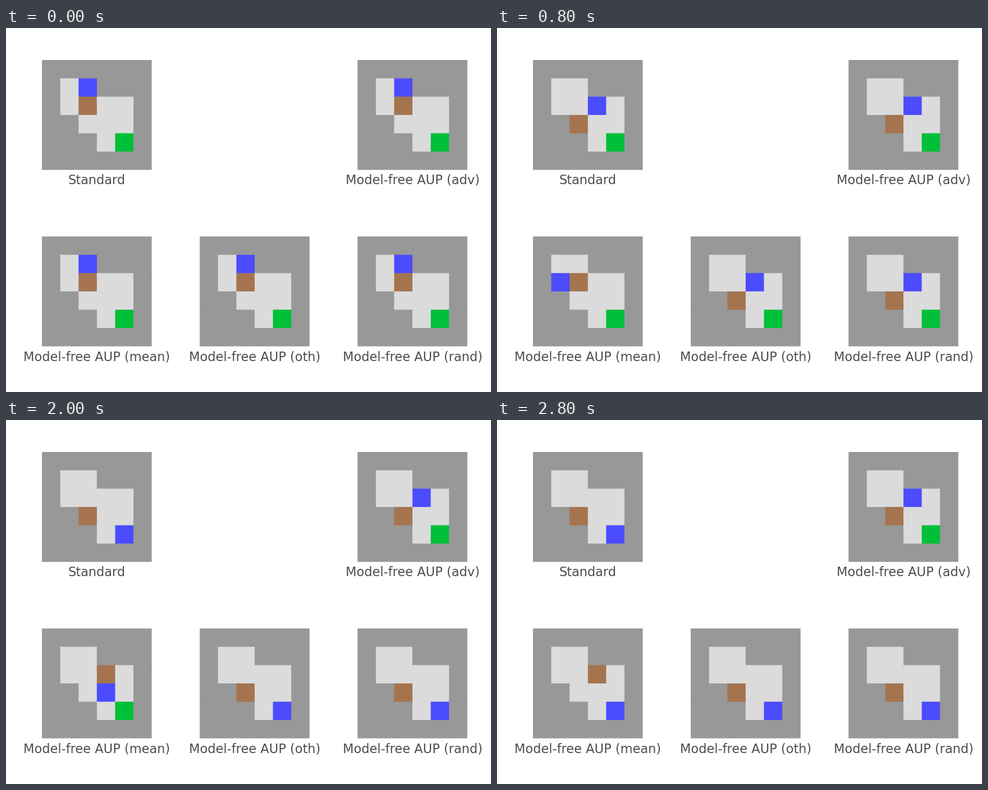
A matplotlib script that plays this animation: 864x648 px, repeating every 4000 ms.

```python
import matplotlib.pyplot as plt
import numpy as np
from matplotlib.animation import FuncAnimation
from matplotlib.colors import to_rgb

W, H, DPI = 864, 648, 135
CELL = 32.6                     # cell size in pixels
LEFT, TOP = 64.05, 57.0         # corner of the first room
PITCH_X, PITCH_Y = 281.1, 314.1

WALL, FLOOR, AGENT, BOX, GOAL = map(
    to_rgb, ("#989898", "#dbdbdb", "#4c4cff", "#a5754f", "#00c03a"))

ROOM = ["######",
        "#.A###",
        "#.X..#",
        "##...#",
        "###.G#",
        "######"]
STEPS = {"L": (0, -1), "R": (0, 1), "U": (-1, 0), "D": (1, 0)}

# Label, panel column, panel row, moves
PANELS = [
    ("Standard", 0, 0, "DRDDR"),
    ("Model-free AUP (adv)", 2, 0, "DR"),
    ("Model-free AUP (mean)", 0, 1, "LDRDRRD"),
    ("Model-free AUP (oth)", 1, 1, "DRRDD"),
    ("Model-free AUP (rand)", 2, 1, "DRDRD"),
]


def find(mark):
    return next((r, line.index(mark)) for r, line in enumerate(ROOM)
                if mark in line)


def coverage(start, size):
    """Share of each pixel (rows) that each of six cells (columns) covers."""
    pixel = np.arange(size)[:, None]
    edge = start + CELL * np.arange(6)
    return np.clip(np.minimum(pixel + 1, edge + CELL)
                   - np.maximum(pixel, edge), 0, 1)


def play(moves):
    """Return agent and box cells after the moves; the agent pushes the box."""
    agent, box = find("A"), find("X")
    for move in moves:
        dr, dc = STEPS[move]
        agent = agent[0] + dr, agent[1] + dc
        if agent == box:
            box = box[0] + dr, box[1] + dc
    return agent, box


def room_colors(moves):
    grid = np.array([[WALL if ch == "#" else FLOOR for ch in line]
                     for line in ROOM])
    agent, box = play(moves)
    for cell, color in ((find("G"), GOAL), (box, BOX), (agent, AGENT)):
        grid[cell] = color
    return grid


def render(step):
    """Paint all rooms on white, with partly covered pixels blended."""
    canvas = np.ones((H, W, 3))
    for _, col, row, moves in PANELS:
        ys = coverage(TOP + row * PITCH_Y, H)
        xs = coverage(LEFT + col * PITCH_X, W)
        ink = 1 - room_colors(moves[:step])
        canvas -= np.einsum("yr,rck,xc->yxk", ys, ink, xs, optimize=True)
    return np.clip(canvas, 0, 1)


fig = plt.figure(figsize=(W / DPI, H / DPI), dpi=DPI, facecolor="white")
ax = fig.add_axes([0, 0, 1, 1])
ax.axis("off")
image = ax.imshow(render(0), extent=(0, W, H, 0), aspect="auto",
                  interpolation="nearest")

for label, col, row, _ in PANELS:
    ax.text(LEFT + col * PITCH_X + 3 * CELL,
            TOP + row * PITCH_Y + 6 * CELL + 25.4,
            label, color="#4d4d4d", fontsize=12, family="DejaVu Sans",
            ha="center", va="baseline")


def draw(step):
    image.set_data(render(step))
    return [image]


anim = FuncAnimation(fig, draw, frames=10, interval=400, repeat=True,
                     repeat_delay=0, blit=False)
plt.show()
```
